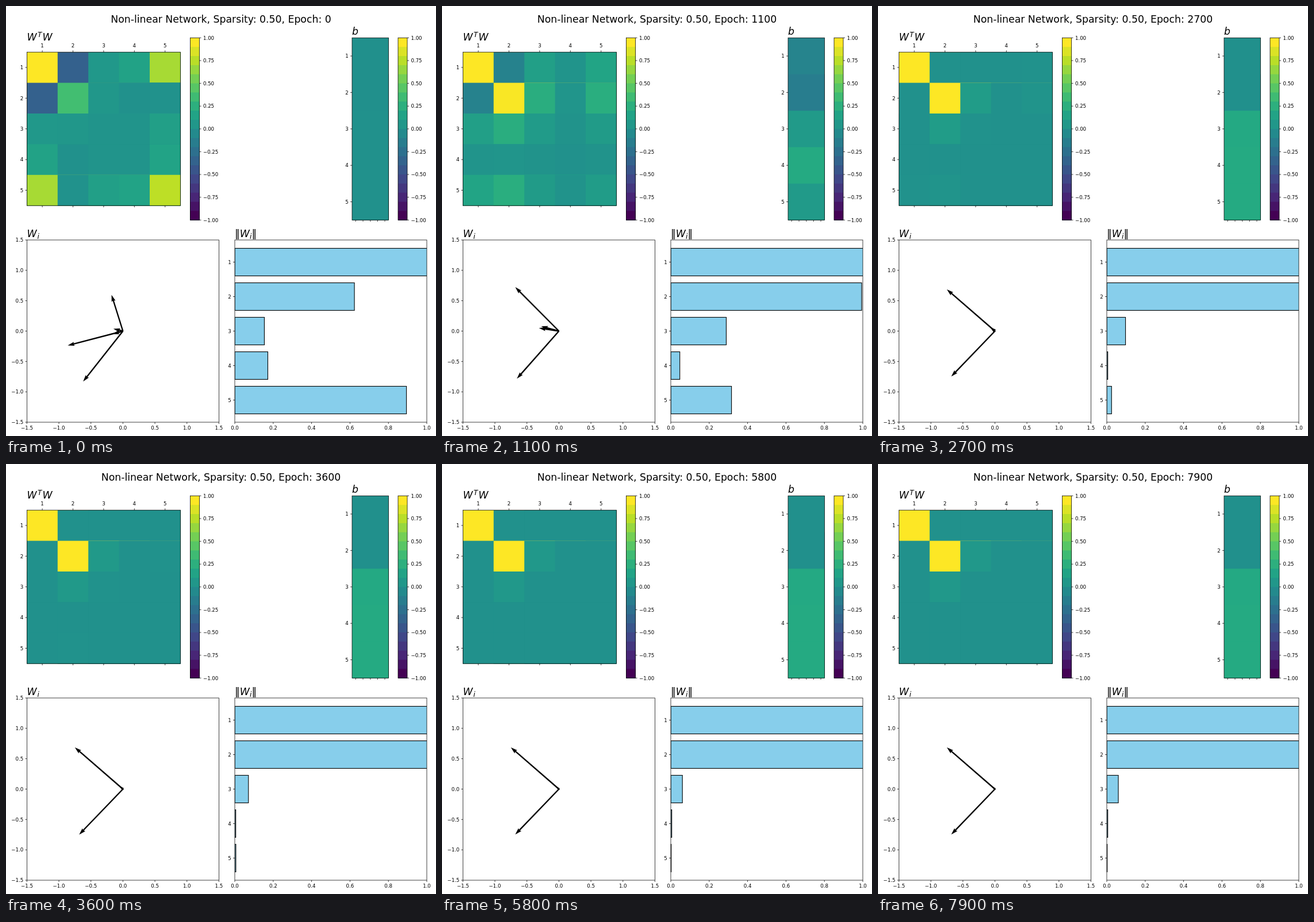
An HTML page with a canvas for the animation above (8000 ms loop, 748 px wide and 748 px high).

```html
<!DOCTYPE html>
<html lang="en">
<head>
<meta charset="utf-8">
<title>Non-linear Network</title>
<style>
  html, body { margin: 0; width: 100%; height: 100%; overflow: hidden; background: #fff; }
  canvas { display: block; width: 748px; height: 748px; }
</style>
</head>
<body>
<canvas id="stage" width="748" height="748"></canvas>
<script>
const ctx = document.getElementById('stage').getContext('2d');
const LOOP = 8000, STEP = 100;
const FONT = '"DejaVu Sans", Verdana, sans-serif';
const SMALL = 8.65, LARGE = 17.3, LINE = 0.75;

// moves from one value to another; a higher power holds the start longer
const settle = (t, from, to, time, power = 1) =>
  to + (from - to) * Math.exp(-((t / time) ** power));

const bell = (t, mid, width) => Math.exp(-(((t - mid) / width) ** 2));

// lengths, and angles in degrees measured upwards from the left
function weights(t) {
  const wobble = 0.026 * Math.cos(Math.PI * t / 600) * Math.exp(-t / 1500);
  const surge = (0.094 + 0.001216 * t) * Math.exp(-t / 600);
  const polar = [
    [1.012 + wobble, settle(t, -53.2, -47.6, 1150, 4)],
    [settle(t, 0.623, 1.017, 513, 1.37), settle(t, 73.4, 42.4, 727, 1.65)],
    [0.06 + surge, settle(t, 14.5, 43, 2200, 4)],
    [settle(t, 0.172, 0.005, 950, 2.2), settle(t, -17, 5, 400)],
    [settle(t, 0.894, 0.002, 1067, 1.4), settle(t, -15.4, 45, 2100)]
  ];
  return polar.map(([len, deg]) => {
    const a = deg * Math.PI / 180;
    return [-len * Math.cos(a), len * Math.sin(a)];
  });
}

const biases = t => [
  -0.01 - 0.12 * bell(t, 900, 400),
  -0.01 - 0.17 * bell(t, 950, 400),
  settle(t, 0, 0.21, 1400, 3),
  settle(t, 0, 0.22, 300, 1.5),
  settle(t, 0, 0.22, 1300, 4) - 0.1 * bell(t, 600, 300)
];

const VIRIDIS = ['440154', '482475', '414487', '355f8d', '2a788e', '21918c',
  '22a884', '44bf70', '7ad151', 'bddf26', 'fde725']
  .map(hex => [0, 2, 4].map(i => parseInt(hex.slice(i, i + 2), 16)));

function viridis(v) {
  const p = Math.min(1, Math.max(0, (v + 1) / 2)) * 10;
  const i = Math.min(9, Math.floor(p));
  const rgb = VIRIDIS[i].map((c, k) => Math.round(c + (VIRIDIS[i + 1][k] - c) * (p - i)));
  return `rgb(${rgb})`;
}

function text(str, x, y, size, align = 'left', style = '') {
  ctx.font = `${style} ${size}px ${FONT}`;
  ctx.textAlign = align;
  ctx.fillStyle = '#000';
  ctx.fillText(str, x, y);
}

const italic = (str, x, y, size = LARGE) => text(str, x, y, size, 'left', 'italic');

function line(x1, y1, x2, y2) {
  ctx.lineWidth = LINE;
  ctx.strokeStyle = '#000';
  ctx.beginPath();
  ctx.moveTo(x1, y1);
  ctx.lineTo(x2, y2);
  ctx.stroke();
}

function frame(x, y, w, h, width = LINE) {
  ctx.lineWidth = width;
  ctx.strokeStyle = '#000';
  ctx.strokeRect(x, y, w, h);
}

function tickLeft(x, y, label) {
  line(x - 3, y, x, y);
  text(label, x - 6.2, y + 3.2, SMALL, 'right');
}

function tickBottom(x, y, label) {
  line(x, y, x, y + 3);
  if (label) text(label, x, y + 13.2, SMALL, 'center');
}

const signed = (v, digits) => v.toFixed(digits).replace('-', '\u2212');

// each cell reaches the far corner; later ones cover it without a seam
function grid(x, y, w, h, rows) {
  rows.forEach((row, r) => row.forEach((v, c) => {
    const dx = w * c / row.length, dy = h * r / rows.length;
    ctx.fillStyle = viridis(v);
    ctx.fillRect(x + dx, y + dy, w - dx, h - dy);
  }));
  frame(x, y, w, h);
}

function colorbar(x) {
  const y = 55.3, h = 317, n = 20;
  grid(x, y, 16, h, Array.from({ length: n }, (_, i) => [1 - 2 * i / (n - 1)]));
  for (let i = 0; i <= 8; i++) {
    const ty = y + h * i / 8;
    line(x + 16, ty, x + 19, ty);
    text(signed(1 - i / 4, 2), x + 22.4, ty + 3.2, SMALL);
  }
}

function drawMatrix(vecs) {
  const x = 36.4, y = 80.2, s = 53.4;
  grid(x, y, s * 5, s * 5, vecs.map(a => vecs.map(b => a[0] * b[0] + a[1] * b[1])));
  for (let i = 0; i < 5; i++) {
    const mid = s * (i + 0.5);
    tickLeft(x, y + mid, i + 1);
    line(x + mid, y - 3, x + mid, y);
    text(i + 1, x + mid, y - 8, SMALL, 'center');
    tickBottom(x + mid, y + s * 5);
  }
  italic('W', 36.5, 60);
  italic('T', 55, 53.5, 12.1);
  italic('W', 63.5, 60);
}

function drawBias(values) {
  const x = 602, y = 55.3, s = 63.4;
  grid(x, y, s, s * 5, values.map(v => [v]));
  for (let i = 0; i < 5; i++) {
    tickLeft(x, y + s * (i + 0.5), i + 1);
    tickBottom(x + s * (i + 0.5) / 5, y + s * 5);
  }
  italic('b', 602, 50);
}

function arrow(ox, oy, dx, dy) {
  const shaft = 2.35, len = Math.hypot(dx, dy);
  ctx.fillStyle = '#000';
  ctx.beginPath();
  if (len < shaft) {
    ctx.arc(ox, oy, shaft / 2, 0, 7);
    ctx.fill();
    return;
  }
  const w = Math.min(shaft, len / 5);
  ctx.save();
  ctx.translate(ox, oy);
  ctx.rotate(Math.atan2(dy, dx));
  [[0, -w / 2], [len - 4.5 * w, -w / 2], [len - 5 * w, -1.5 * w], [len, 0],
   [len - 5 * w, 1.5 * w], [len - 4.5 * w, w / 2], [0, w / 2]]
    .forEach(p => ctx.lineTo(...p));
  ctx.fill();
  ctx.restore();
}

function drawVectors(vecs) {
  const x = 36.4, y = 407, w = 334, h = 317;
  vecs.forEach(([vx, vy]) => arrow(x + w / 2, y + h / 2, vx * w / 3, -vy * h / 3));
  frame(x, y, w, h);
  for (let i = 0; i <= 6; i++) {
    const label = signed(i / 2 - 1.5, 1);
    tickBottom(x + w * i / 6, y + h, label);
    tickLeft(x, y + h - h * i / 6, label);
  }
  italic('W', 36.5, 402);
  italic('i', 54.5, 405, 12.1);
}

function drawNorms(vecs) {
  const x = 398, y = 407, w = 334, h = 317;
  ctx.save();
  ctx.beginPath();
  ctx.rect(x, y, w, h);
  ctx.clip();
  vecs.forEach(([vx, vy], i) => {
    const len = Math.hypot(vx, vy) * w, top = 421.5 + 60 * i;
    ctx.fillStyle = '#87ceeb';
    ctx.fillRect(x, top, len, 48);
    frame(x, top, len, 48, 1.1);
  });
  ctx.restore();
  frame(x, y, w, h);
  for (let i = 0; i < 5; i++) tickLeft(x, 445.5 + 60 * i, i + 1);
  for (let i = 0; i <= 5; i++) tickBottom(x + w * i / 5, y + h, (i / 5).toFixed(1));
  text('\u2016', 398, 402, LARGE);
  italic('W', 406.7, 402);
  italic('i', 424, 405, 12.1);
  text('\u2016', 427.5, 402, LARGE);
}

function draw(now) {
  const t = Math.floor((now % LOOP) / STEP) * STEP;
  const vecs = weights(t);
  ctx.fillStyle = '#fff';
  ctx.fillRect(0, 0, 748, 748);
  text(`Non-linear Network, Sparsity: 0.50, Epoch: ${t}`, 374, 28.5, LARGE, 'center');
  drawMatrix(vecs);
  colorbar(320.5);
  drawBias(biases(t));
  colorbar(682);
  drawVectors(vecs);
  drawNorms(vecs);
}

function tick() {
  draw(performance.now());
  requestAnimationFrame(tick);
}
tick();
</script>
</body>
</html>
```
